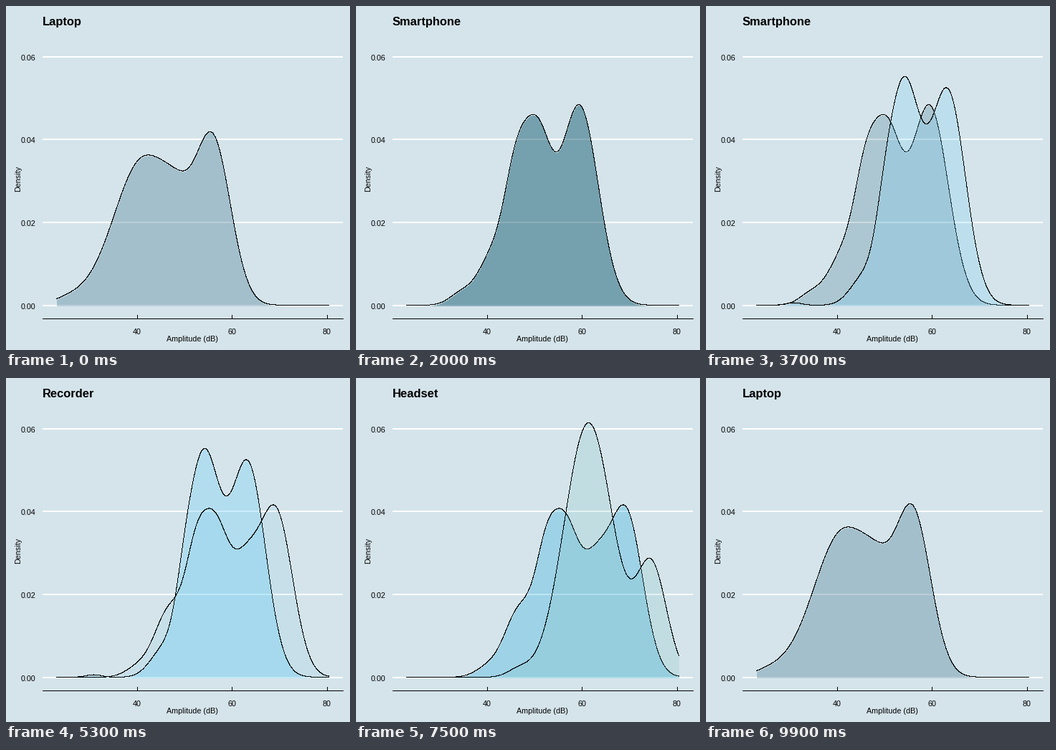
A matplotlib script that plays this animation: 480x480 px, repeating every 10 s.

```python
import matplotlib.pyplot as plt
import numpy as np
from matplotlib.animation import FuncAnimation

SIZE, DPI = 480, 100
PX = 72 / DPI               # points per pixel
BASE, STEP = 418, 115.8     # zero line and spacing of the grid, in pixels
ALPHA = 0.45
FADE = 7                    # steps from one state to the next

# Title, fill colour, bumps of the density as (height, centre, width) in pixels
STATES = [
    ("Laptop", "#6794a7",
     [(8, 88, 24), (205, 192, 42), (47, 238, 20), (223, 288, 25)]),
    ("Smartphone", "#014d64",
     [(18, 148, 17), (54, 185, 17), (176, 222, 18), (198, 254, 18.5),
      (278, 311, 26.4)]),
    ("Recorder", "#7ad2f6",
     [(3.5, 122, 11), (33, 217, 18), (40, 247, 12), (304, 275, 22.8),
      (295, 337, 24.5)]),
    ("Headset", "#01a2d9",
     [(12, 182, 17), (94, 228, 21), (107, 263, 15), (200, 291, 20),
      (122, 333, 19), (229, 376, 23.3)]),
    ("Lavalier", "#76c0c1",
     [(10, 226, 15), (355, 324, 34), (152, 412, 21)]),
]
# First frame of each crossfade, evenly spaced over the loop
STARTS = [int(14.4 + 19.7 * k) for k in range(len(STATES))]


def density(bumps, x):
    return sum(h * np.exp(-((x - c) / s) ** 2 / 2) for h, c, s in bumps)


plt.rcParams["font.family"] = "Liberation Sans"
fig = plt.figure(figsize=(SIZE / DPI, SIZE / DPI), dpi=DPI, facecolor="#d5e4eb")
ax = fig.add_axes([0, 0, 1, 1])
ax.set_xlim(0, SIZE)
ax.set_ylim(SIZE, 0)
ax.axis("off")


def rule(xs, ys, color="black", width=1):
    ax.plot(xs, ys, color=color, lw=width * PX, antialiased=False,
            solid_capstyle="butt", zorder=0)


def label(x, y, text, size=10.8, **kw):
    return ax.text(x, y, text, fontsize=size * PX, va="baseline", **kw)


# Grid, axis and labels
for k in range(4):
    y = BASE - STEP * k
    rule([51, 470], [y, y], "white", 2)
    label(41.5, y + 5, f"{0.02 * k:.2f}", ha="right")
rule([51, 470], [436, 436])
for db in (40, 60, 80):
    x = 182.9 + (db - 40) * 6.62
    rule([x, x], [431, 436])
    label(x, 458, str(db), ha="center")
label(259.5, 468, "Amplitude (dB)", ha="center")
label(20, 240.5, "Density", ha="center", rotation=90, rotation_mode="anchor")
title = label(50.6, 27, "", 16.5, weight="bold")

# One fill and one outline per state; the outline is a trail of single pixels
grid = np.linspace(70, 450, 3801)
layers = []
for z, (_, color, bumps) in enumerate(STATES, 1):
    ys = BASE - density(bumps, grid)
    fill = ax.fill_between(grid + 0.5, ys + 0.5, BASE + 0.5, color=color, lw=0,
                           zorder=z)
    line, = ax.plot(grid, ys, ls="", marker=",", color="black", zorder=z)
    layers.append((fill, line))


def draw(frame):
    count = sum(s <= frame for s in STARTS)
    step = min(frame - STARTS[count - 1] + 1, FADE) if count else FADE
    old, new = (count - 1) % len(STATES), count % len(STATES)
    weights = {old: 1 - step / FADE, new: step / FADE}
    for i, (fill, line) in enumerate(layers):
        w = weights.get(i, 0)
        fill.set_alpha(ALPHA * w)
        fill.set_visible(w > 0)
        line.set_visible(w > 0)
    title.set_text(STATES[new if step >= 5 else old][0])
    return [title, *(artist for pair in layers for artist in pair)]


anim = FuncAnimation(fig, draw, frames=100, interval=100, repeat=True,
                     repeat_delay=0, blit=False)
plt.show()
```
